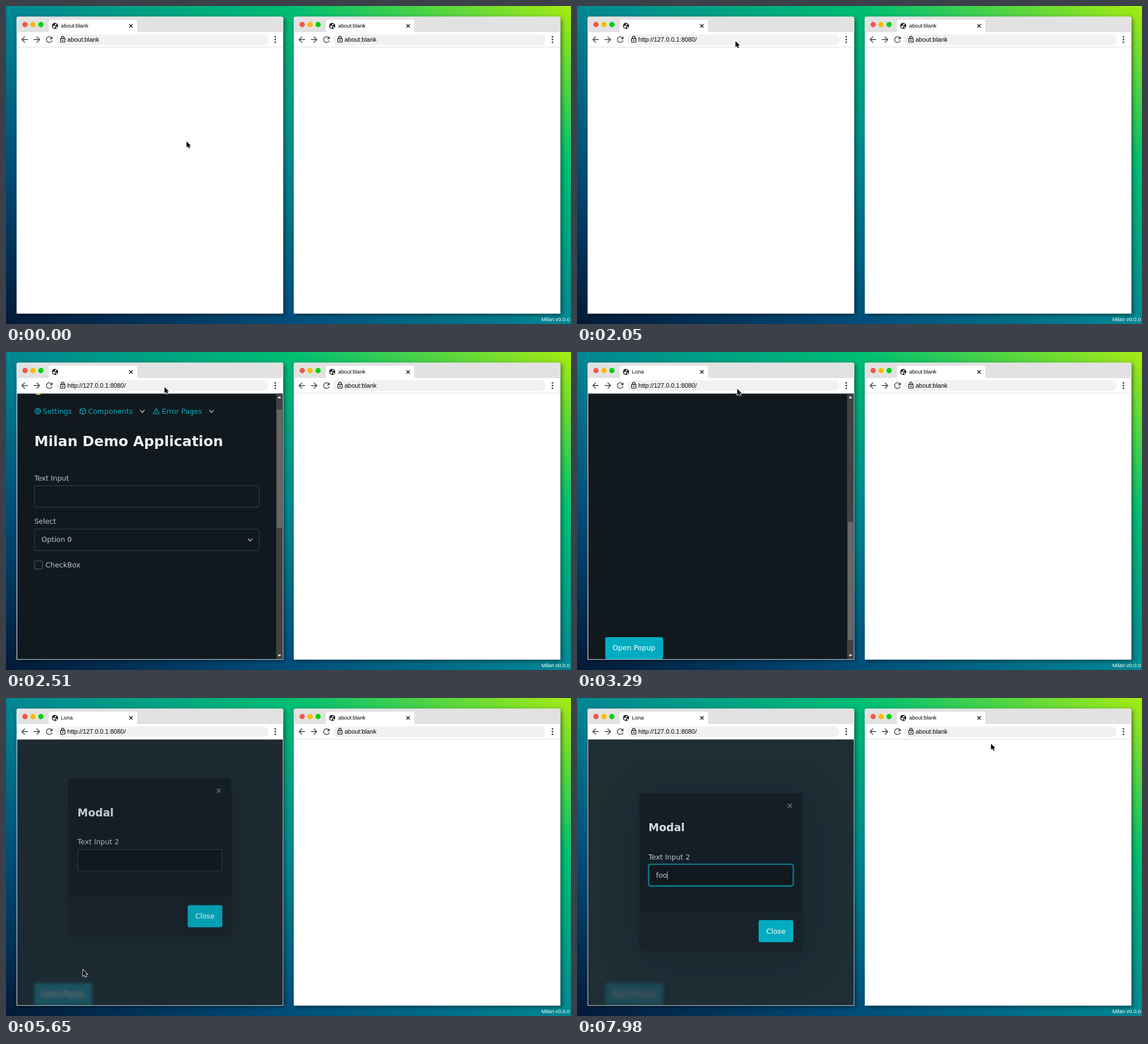
An HTML page for the animation above (8000 ms loop, 998 px wide and 561 px high).

```html
<!DOCTYPE html>
<html lang="en">
<head>
<meta charset="utf-8">
<title>Browser demo</title>
<style>
  html, body { margin: 0; width: 100%; height: 100%; overflow: hidden; }
  body { background: linear-gradient(to right top, #051937, #004d7a, #008793, #00bf72, #a8eb12); }
  svg { display: block; width: 100%; height: 100%; }
  text { white-space: pre; }
  .chrome { font: 14px "Liberation Sans", Arial, sans-serif; }
  .small { font-size: 12px; }
  .page { font: 16px "DejaVu Sans", sans-serif; fill: #bbc6ce; }
  .field { fill: #11191f; stroke: #374956; stroke-width: 1.2; }
  .link { fill: #00acc1; }
  .line { fill: none; stroke: #00acc1; stroke-width: 1.4; stroke-linejoin: round; }
  .chevron { fill: none; stroke: #a2afb9; stroke-width: 2; stroke-linecap: round; stroke-linejoin: round; }
  .shadow { filter: drop-shadow(3px 3px 5px rgba(0, 0, 0, .5)); }
  .card { filter: drop-shadow(3px 7px 20px rgba(0, 0, 0, .06)) drop-shadow(8px 16px 48px rgba(0, 0, 0, .12)); }
</style>
</head>
<body>
<svg viewBox="0 0 1280 719.5" preserveAspectRatio="none">
  <defs>
    <clipPath id="viewport"><rect x="25" y="94" width="602" height="601"/></clipPath>
    <filter id="blur" filterUnits="userSpaceOnUse" x="25" y="60" width="602" height="1300">
      <feGaussianBlur id="blurAmount" stdDeviation="0"/>
    </filter>
    <path id="chevron" class="chevron" d="M-4.5-2.5 0 2.5 4.5-2.5"/>
    <g id="window">
      <path class="shadow" fill="#fff" d="M24 696V28q0-4 4-4H624q4 0 4 4V696z"/>
      <path fill="#e2e2e2" d="M24 59V28q0-4 4-4H624q4 0 4 4V59z"/>
      <circle cx="43" cy="42" r="6" fill="#f25749"/>
      <circle cx="61" cy="42" r="6" fill="#f5bd00"/>
      <circle cx="79" cy="42" r="6" fill="#00d30f"/>
      <path fill="#fff" d="M97 59V35q0-4 4-4H293q4 0 4 4V59z"/>
      <circle cx="111" cy="45" r="6.8"/>
      <path fill="#fff" d="M105.5 43.5l4 3 1.5 4.3q-4.6-.6-5.5-7.3zM111 39.6l4 .9-1 2.6-3 .7-.6 2 4 .3 1.6 2.2-1.3 1.6-2.5-2-3.2-1-.5-2.5 2.7-2z"/>
      <path d="M279.3 41.3l7.4 7.4m0-7.4l-7.4 7.4" stroke="#111" stroke-width="1.7"/>
      <path d="M24 93H628" stroke="#ddd" stroke-width="1.3"/>
      <g fill="#444">
        <path id="arrow" transform="translate(31 65) scale(.92)" d="M20 11H7.83l5.59-5.59L12 4l-8 8 8 8 1.41-1.41L7.83 13H20z"/>
        <use href="#arrow" transform="translate(112 0) scale(-1 1)"/>
        <path transform="translate(87 65) scale(.92)" d="M17.65 6.35A7.96 7.96 0 0 0 12 4a8 8 0 1 0 7.73 10h-2.08A6 6 0 1 1 12 6c1.66 0 3.14.69 4.22 1.78L13 11h7V4z"/>
        <circle cx="610" cy="70" r="1.9"/><circle cx="610" cy="76" r="1.9"/><circle cx="610" cy="82" r="1.9"/>
      </g>
    </g>
    <path id="lock" transform="translate(120.2 67) scale(.7)" fill-rule="evenodd"
      d="M12 17a2 2 0 1 0 0-4 2 2 0 0 0 0 4zm6-9h-1V6A5 5 0 0 0 7 6v2H6a2 2 0 0 0-2 2v10a2 2 0 0 0 2 2h12a2 2 0 0 0 2-2V10a2 2 0 0 0-2-2zM8.9 6a3.1 3.1 0 0 1 6.2 0v2H8.9zM18 20H6V10h12z"/>
  </defs>

  <g class="chrome">
    <use href="#window"/>
    <rect id="addressBar" x="113" y="64" width="481.5" height="24.5" rx="12.2" fill="#f1f1f1"/>
    <use href="#lock"/>
    <text id="title" class="small" x="124.5" y="49"></text>
    <text id="address" x="139" y="81"></text>
    <g transform="translate(628 0)">
      <use href="#window"/>
      <rect x="113" y="64" width="481.5" height="24.5" rx="12.2" fill="#f1f1f1"/>
      <use href="#lock"/>
      <text class="small" x="124.5" y="49">about:blank</text>
      <text x="139" y="81">about:blank</text>
    </g>
    <text class="small" x="1277.5" y="713.5" text-anchor="end" fill="#fff">Milan v0.0.0</text>
  </g>

  <g id="page" class="page" clip-path="url(#viewport)">
    <rect x="25" y="94" width="602" height="601" fill="#11191f"/>
    <g id="blurred">
      <g id="content">
        <circle cx="73" cy="89" r="9" fill="#e6d36a"/>
        <g class="line">
          <circle cx="72" cy="134.5" r="2.4"/>
          <circle cx="72" cy="134.5" r="5.6"/>
          <circle cx="72" cy="134.5" r="6.8" stroke-dasharray="2.6 2.74"/>
          <path d="M174 127.5l6.5 3.5v7.5l-6.5 3.5-6.5-3.5V131zM167.5 131l6.5 3.5 6.5-3.5M174 134.5V142"/>
          <path d="M340.5 128l7 12.5h-14zM340.5 132.5v4m0 1.5v1.2"/>
        </g>
        <g class="link">
          <text x="83.5" y="140.3">Settings</text>
          <text x="186" y="140.3">Components</text>
          <text x="353" y="140.3">Error Pages</text>
        </g>
        <use href="#chevron" x="309" y="135"/>
        <use href="#chevron" x="465.5" y="135"/>
        <text x="64" y="214" font-size="32" font-weight="700" fill="#edf0f3">Milan Demo Application</text>
        <text x="64" y="292">Text Input</text>
        <rect class="field" x="64.5" y="303.5" width="509" height="48.5" rx="4"/>
        <text x="64" y="390">Select</text>
        <rect class="field" x="64.5" y="401.5" width="509" height="48.5" rx="4"/>
        <text x="80.5" y="431">Option 0</text>
        <use href="#chevron" x="553" y="426"/>
        <rect class="field" x="64.7" y="473.7" width="18" height="18" rx="3" style="stroke-width:2"/>
        <text x="89.5" y="488">CheckBox</text>
        <rect x="64" y="1217" width="131" height="50" rx="4" fill="#00acc1"/>
        <text x="80.5" y="1246.5" fill="#fff">Open Popup</text>
      </g>
    </g>
    <g id="scrollbar">
      <rect x="612" y="94" width="15" height="601" fill="#424242"/>
      <rect id="thumb" x="613.5" width="12" height="267" fill="#686868"/>
      <path fill="#fff" d="M615.5 104.5l4-4.5 4 4.5zM615.5 684.5l4 4.5 4-4.5z"/>
    </g>
    <rect id="overlay" x="25" y="94" width="602" height="601" fill="#23323b"/>
    <g id="modal">
      <rect class="card" x="141.5" y="215.5" width="369" height="356.5" rx="4" fill="#141e26"/>
      <path fill="#18232c" d="M141.5 482.5h369V568q0 4-4 4h-361q-4 0-4-4z"/>
      <path d="M477.5 239l9 9m0-9l-9 9" stroke="#566570" stroke-width="2.8"/>
      <text x="162" y="301.8" font-size="24" font-weight="700" fill="#d5dce2">Modal</text>
      <text x="162" y="365">Text Input 2</text>
      <rect class="field" x="162.5" y="376.5" width="327" height="48.5" rx="4"/>
      <g id="focus" fill="none" stroke="#00acc1">
        <rect x="161.5" y="375.5" width="329" height="50.5" rx="5" stroke-width="4" opacity=".25"/>
        <rect x="162.5" y="376.5" width="327" height="48.5" rx="4" stroke-width="1.3"/>
      </g>
      <text id="typed" x="179" y="407"></text>
      <rect id="caret" y="392" width="1.3" height="18.5"/>
      <rect x="411.5" y="502.5" width="78.5" height="50" rx="4" fill="#00acc1"/>
      <text x="429" y="533" fill="#fff">Close</text>
    </g>
  </g>

  <path id="cursor" d="M0 0V13.5l3.2-2.9 2.2 5 2.5-1.1-2.2-4.9H10z" stroke="#fff" stroke-width="2" paint-order="stroke"/>
</svg>

<script>
const LOOP = 8000;
const SCROLL_END = 620;
const CONTENT_SCROLL = 48;  // scroll offset at which the content is laid out

// Cursor path: [start, end, from, to]
const moves = [
  [20, 640, [409, 306.5], [359, 79.5]],
  [3360, 3960, [363, 83.5], [133, 671.5]],
  [5460, 6050, [133, 671.5], [330.5, 403]],
  [7497, 8097, [330.5, 403], [987, 79.5]],
];
const clicks = [[880, 1410], [4210, 4720], [6340, 6720]];

const el = Object.fromEntries([...document.querySelectorAll('[id]')].map(e => [e.id, e]));
const progress = (t, start, end) => Math.min(1, Math.max(0, (t - start) / (end - start)));
const sine = x => (1 - Math.cos(Math.PI * x)) / 2;
const quad = x => x < .5 ? 2 * x * x : 1 - 2 * (1 - x) ** 2;
const pulse = (t, [start, end]) => Math.sin(Math.PI * progress(t, start, end));
const show = (e, visible) => e.setAttribute('visibility', visible ? 'visible' : 'hidden');

function cursorAt(t) {
  const [start, end, from, to] = moves.findLast(m => t >= m[0]) ?? moves[0];
  if (t >= 3290 && t < 3360) return moves[1][2];
  const k = quad(progress(t, start, end));
  return from.map((v, i) => v + (to[i] - v) * k);
}

function drawChrome(t) {
  el.title.textContent = t < 1950 ? 'about:blank' : t < 2600 ? '' : 'Lona';
  el.address.textContent = t < 1600 ? 'about:blank' : 'http://127.0.0.1:8080/';
  const shade = 241 - 12 * pulse(t, clicks[0]);
  el.addressBar.setAttribute('fill', `rgb(${shade},${shade},${shade})`);
}

function drawPage(t) {
  el.page.style.display = t < 2090 ? 'none' : '';
  const scroll = SCROLL_END * sine(progress(t, 2361, 3190));
  el.content.setAttribute('transform', `translate(0 ${CONTENT_SCROLL - scroll})`);
  el.thumb.setAttribute('y', 109 + scroll * 571 / 1285);
  show(el.scrollbar, t < 4600);
}

function drawModal(t) {
  const k = sine(progress(t, 5253, 5750));
  el.modal.style.display = k ? '' : 'none';
  el.modal.setAttribute('opacity', k);
  el.modal.setAttribute('transform', `translate(0 ${-356.5 * (1 - k)})`);
  el.overlay.setAttribute('opacity', .8 * k);
  el.blurAmount.setAttribute('stdDeviation', 4 * k);
  if (k) el.blurred.setAttribute('filter', 'url(#blur)');
  else el.blurred.removeAttribute('filter');

  const count = [6890, 7030, 7170].filter(time => t >= time).length;
  el.typed.textContent = 'foo'.slice(0, count);
  el.caret.setAttribute('x', 179 + [0, 5.6, 15.4, 25.2][count]);
  show(el.caret, t >= 6450);
  el.focus.setAttribute('opacity', progress(t, 6890, 7090));
}

function drawCursor(t) {
  const [x, y] = cursorAt(t);
  const scale = 1 - .2 * Math.max(...clicks.map(c => pulse(t, c)));
  el.cursor.setAttribute('transform', `translate(${x + 5} ${y + 7}) scale(${scale}) translate(-5 -7)`);
}

function frame(now) {
  const t = now % LOOP;
  drawChrome(t);
  drawPage(t);
  drawModal(t);
  drawCursor(t);
  requestAnimationFrame(frame);
}

const startTime = performance.now();
requestAnimationFrame(function tick() {
  const t = performance.now() - startTime;
  drawChrome(t % LOOP);
  frame(t);
});
</script>
</body>
</html>
```
